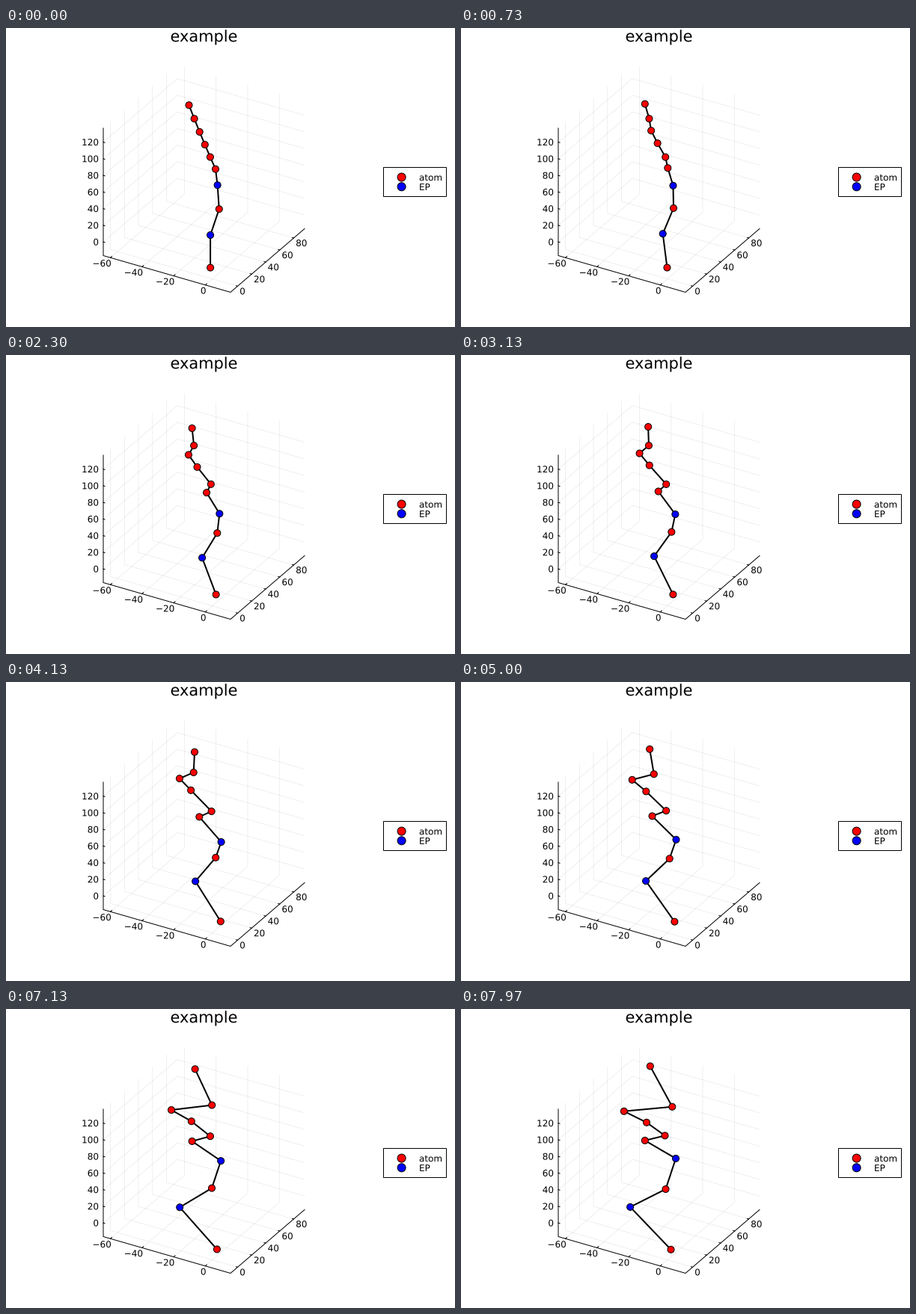
Animation, 600 px wide and 400 px high, one loop 8000 ms. Source, as a matplotlib script:

```python
import numpy as np
import matplotlib.pyplot as plt
from matplotlib.animation import FuncAnimation
from matplotlib.patches import Circle, PathPatch, Rectangle
from matplotlib.textpath import TextPath
from matplotlib.transforms import Affine2D

W, H, DPI = 600, 400, 100
LOOP, FRAMES = 8000, 250
PX = 72 / DPI  # points per pixel

plt.rcParams["font.family"] = "DejaVu Sans"
fig = plt.figure(figsize=(W / DPI, H / DPI), dpi=DPI, facecolor="white")
ax = fig.add_axes([0, 0, 1, 1])
ax.set(xlim=(0, W), ylim=(H, 0))
ax.axis("off")

# Projected axes: origin at the left corner, one screen vector per axis
ORIGIN = np.array([130.0, 304.5])
X_VEC = np.array([170.0, 49.0])
Y_VEC = np.array([99.0, -85.0])
Z_VEC = np.array([0.0, -170.5])


def at(x, y, z):
    return ORIGIN + x * X_VEC + y * Y_VEC + z * Z_VEC


def line(*pts, width=1.0, **style):
    ax.plot(*np.array(pts).T, color="black", lw=width * PX, **style)


def grid(*pts):
    line(*pts, width=0.6, alpha=0.1, zorder=1)


def label(x, y, text, align="left", size=12):
    path = TextPath((0, 0), text, size=size)
    box = path.get_extents()
    x -= {"left": 0, "center": (box.x0 + box.x1) / 2, "right": box.x1}[align]
    path = path.transformed(Affine2D().scale(1, -1).translate(x, y))
    ax.add_patch(PathPatch(path, fc="black", lw=0, zorder=4))


def dot(x, y, radius, color, zorder):
    return ax.add_patch(Circle((x, y), radius, fc=color, ec="black", lw=PX,
                               zorder=zorder))


def draw_axes():
    line(at(0, 0, 1), at(0, 0, 0), at(1, 0, 0), at(1, 1, 0), zorder=2)
    for i in range(4):
        u = (9.5 + 42.25 * i) / 170
        grid(at(u, 0, 0), at(u, 1, 0), at(u, 1, 1))
        line(at(u, 0, 0), at(u, 0.02, 0))
        x, y = at(u, 0, 0)
        label(x + 0.5, y + 11.8, str(20 * i - 60).replace("-", "\u2212"), "right")
    for i in range(5):
        u = (9.5 + 18.75 * i) / 99
        grid(at(1, u, 0), at(0, u, 0), at(0, u, 1))
        line(at(1, u, 0), at(0.988, u, 0))
        x, y = at(1, u, 0)
        label(x + 2.7, y + 11, str(20 * i))
    for i in range(7):
        u = (18.3 + 22.25 * i) / 170.5
        grid(at(0, 0, u), at(0, 1, u), at(1, 1, u))
        line(at(0, 0, u), at(0.012, 0, u))
        x, y = at(0, 0, u)
        label(x - 6.8, y + 4.4, str(20 * i), "right")


def draw_legend():
    ax.add_patch(Rectangle((504, 186), 84, 39, fc="white", ec="black", lw=PX,
                           zorder=3))
    for y, color, text in ((199.6, "red", "atom"), (212.3, "blue", "EP")):
        dot(528.6, y, 5.5, color, 4)
        label(552, y + 4.6, text)


# The chain, top to bottom: an almost straight rod that crumples in two stages
k = np.arange(6)
rod = np.column_stack([244.5 + 7.1 * k, 103.2 + 18.4 * k - 0.26 * k**2])
STRAIGHT = np.vstack([rod, [(282.6, 210.2), (284.8, 242.2), (273.1, 277),
                            (273.1, 320.6)]])
BENT = np.array([(252, 93.7), (250.7, 121), (231.9, 129.1), (247.1, 144.8),
                 (274.6, 173), (258.3, 180.4), (287.6, 214), (280.2, 234.9),
                 (253.1, 266.6), (286.8, 320.3)])
FOLDED = np.array([(252.8, 76.5), (282.3, 130.8), (217.8, 136.8), (248, 151.8),
                   (272.5, 169.4), (245.8, 175.9), (287, 200), (273.5, 241),
                   (226.1, 264.9), (280.5, 321.8)])
BEND_TIME, FOLD_TIME = 4130, 7970


def chain(t):
    if t < BEND_TIME:
        return STRAIGHT + (BENT - STRAIGHT) * t / BEND_TIME
    u = min((t - BEND_TIME) / (FOLD_TIME - BEND_TIME), 1)
    return BENT + (FOLDED - BENT) * u


draw_axes()
draw_legend()
label(264.5, 18.2, "example", "center", 20.9)
bonds, = ax.plot([], [], color="black", lw=2 * PX, zorder=5)
atoms = [dot(x, y, 4.5, "blue" if i in (6, 8) else "red", 6)
         for i, (x, y) in enumerate(STRAIGHT)]


def update(n):
    points = chain(n * LOOP / FRAMES)
    bonds.set_data(*points.T)
    for atom, point in zip(atoms, points):
        atom.center = point
    return [bonds, *atoms]


anim = FuncAnimation(fig, update, frames=FRAMES, interval=LOOP // FRAMES,
                     repeat=True, repeat_delay=0, blit=False)
plt.show()
```
